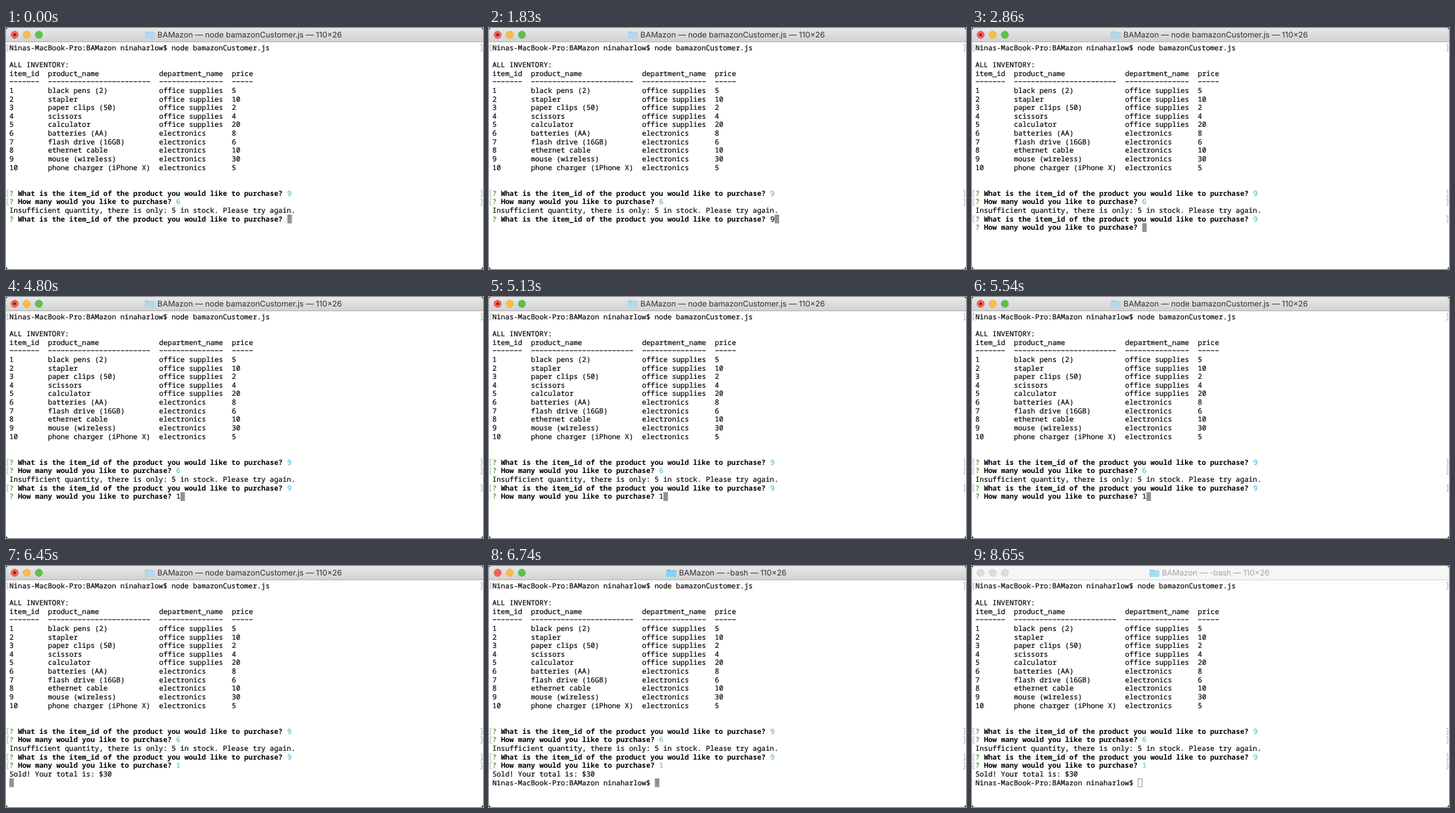
Write an HTML page that moves like this. It is 705 px wide and 356 px high and loops after 8820 ms.

```html
<!DOCTYPE html>
<html lang="en">
<head>
<meta charset="utf-8">
<title>Terminal</title>
<style>
html, body { margin: 0; width: 100%; height: 100%; overflow: hidden; background: #2b2b2b; }
svg { display: block; width: 705px; height: 356px; }
text { white-space: pre; text-rendering: geometricPrecision; }
.mono { font: 10.535px "Noto Sans Mono", "DejaVu Sans Mono", monospace; fill: #000; stroke: #000; stroke-width: .18px; }
.bold { font-weight: 700; stroke: none; }
.ok { fill: #5fa644; stroke: none; }
.answer { fill: #5ab9cf; stroke: #5ab9cf; }
.title { font: 11.55px Inter, "Open Sans", sans-serif; text-anchor: middle; }
.mark { fill: none; stroke: #a8a8a8; stroke-width: .9px; }
</style>
</head>
<body>
<svg id="stage" viewBox="0 0 705 356">
  <defs>
    <linearGradient id="bar" x1="0" y1="0" x2="0" y2="1">
      <stop offset="0" stop-color="#e8e8e8"/>
      <stop offset="1" stop-color="#d2d2d2"/>
    </linearGradient>
    <clipPath id="window"><rect width="705" height="356" rx="4.5"/></clipPath>
  </defs>
  <g id="root" clip-path="url(#window)"></g>
</svg>
<script>
const LOOP = 8820;
const TYPE_ID = 1830, SEND_ID = 2860, TYPE_QTY = 4800, SEND_QTY = 6450, DONE = 6580, BLUR = 8650;
const CELL = 6.321, ROW = 12.65, LEFT = 5, TOP = 23;
const HOST = 'Ninas-MacBook-Pro:BAMazon ninaharlow$ ';
const ASK_ID = 'What is the item_id of the product you would like to purchase?';
const ASK_QTY = 'How many would you like to purchase?';

const root = document.getElementById('root');
const timed = [];

function add(tag, attrs, from = 0, to = LOOP, label) {
  const el = document.createElementNS('http://www.w3.org/2000/svg', tag);
  for (const key in attrs) el.setAttribute(key, attrs[key]);
  if (label) el.textContent = label;
  root.append(el);
  if (from > 0 || to < LOOP) timed.push({ el, from, to });
}

const colX = col => LEFT + col * CELL;
const rowY = row => TOP + row * ROW;

function print(row, col, label, style = '', from, to) {
  add('text', { class: 'mono ' + style, x: colX(col), y: rowY(row) + 9.6 }, from, to, label);
}

function brackets(row, from) {
  const y = rowY(row) + 1.6;
  add('path', { class: 'mark', d: `M4 ${y}H1.8v9.4H4M701 ${y}h2.2v9.4H701` }, from);
}

function ask(row, question, from) {
  print(row, 0, '?', 'bold ok', from);
  print(row, 2, question, 'bold', from);
}

function answer(row, question, value, typed, sent) {
  const col = question.length + 3;
  if (typed < sent) print(row, col, value, '', typed, sent);
  print(row, col, value, 'answer', sent);
  brackets(row, sent);
}

function cursor(row, col, from, to, hollow) {
  const inset = hollow ? .5 : 0;
  add('rect', {
    x: colX(col) + inset, y: rowY(row) - .3 + inset,
    width: CELL + .3 - 2 * inset, height: ROW + .3 - 2 * inset,
    fill: hollow ? 'none' : '#929292', stroke: hollow ? '#929292' : 'none'
  }, from, to);
}

function folder(x, color, tab, from, to) {
  add('path', { d: `M${x} 6.2q0-1.2 1.2-1.2h4l1.4 1.3h6.6q1.2 0 1.2 1.2v7.3q0 1-1 1H${x + 1}q-1 0-1-1z`, fill: tab }, from, to);
  add('rect', { x, y: 7.5, width: 14.4, height: 8.3, rx: .9, fill: color }, from, to);
}

function lights(colors, rims, from, to) {
  colors.forEach((fill, i) => add('circle', {
    cx: 12.8 + i * 17.9, cy: 10, r: 5.4, fill, stroke: rims[i], 'stroke-width': .6
  }, from, to));
}

function titleText(label, from, to, fill = '#303030') {
  add('text', { class: 'title', x: 360.2, y: 14.3, fill }, from, to, label);
}

// Window
add('rect', { width: 705, height: 356, fill: '#fff' });
add('rect', { width: 705, height: 20, fill: 'url(#bar)' }, 0, BLUR);
add('rect', { width: 705, height: 20, fill: '#f6f6f6' }, BLUR);
add('rect', { y: 20, width: 705, height: 1, fill: '#b4b4b4' }, 0, BLUR);
add('rect', { y: 20, width: 705, height: 1, fill: '#d4d4d4' }, BLUR);
lights(['#f4605a', '#f8be44', '#5bc346'], ['#dc4c46', '#dca536', '#49ab37'], 0, BLUR);
lights(['#dcdcdc', '#dcdcdc', '#dcdcdc'], ['#c9c9c9', '#c9c9c9', '#c9c9c9'], BLUR);
add('circle', { cx: 12.8, cy: 10, r: 1.9, fill: '#7d120e' }, 0, DONE);
folder(205.3, '#b4d9ea', '#a4cfe3', 0, DONE);
folder(262.3, '#86d2f6', '#6cc2ea', DONE, BLUR);
folder(262.3, '#a9dcf4', '#98d0ec', BLUR);
const bashTitle = 'BAMazon — -bash — 110×26';
titleText('BAMazon — node bamazonCustomer.js — 110×26', 0, DONE);
titleText(bashTitle, DONE, BLUR);
titleText(bashTitle, BLUR, LOOP, '#a3a3a3');

// Inventory; the rules use the wide minus sign
const columns = [[0, 7], [9, 24], [35, 15], [52, 5]];
const office = 'office supplies', tech = 'electronics';
const items = [
  ['black pens (2)', office, 5], ['stapler', office, 10],
  ['paper clips (50)', office, 2], ['scissors', office, 4],
  ['calculator', office, 20], ['batteries (AA)', tech, 8],
  ['flash drive (16GB)', tech, 6], ['ethernet cable', tech, 10],
  ['mouse (wireless)', tech, 30], ['phone charger (iPhone X)', tech, 5]
];
const table = [
  ['item_id', 'product_name', 'department_name', 'price'],
  columns.map(([, width]) => '−'.repeat(width)),
  ...items.map((item, i) => [i + 1, ...item])
];
print(0, 0, HOST + 'node bamazonCustomer.js');
brackets(0);
print(2, 0, 'ALL INVENTORY:');
table.forEach((cells, r) => cells.forEach((cell, c) => print(r + 3, columns[c][0], String(cell))));

// Session
const idCol = ASK_ID.length + 3, qtyCol = ASK_QTY.length + 3;
cursor(20, idCol, 0, TYPE_ID);
cursor(20, idCol + 1, TYPE_ID, SEND_ID);
cursor(21, qtyCol, SEND_ID, TYPE_QTY);
cursor(21, qtyCol + 1, TYPE_QTY, SEND_QTY);
cursor(23, 0, SEND_QTY, DONE);
cursor(23, HOST.length, DONE, BLUR);
cursor(23, HOST.length, BLUR, LOOP, true);

ask(17, ASK_ID);
answer(17, ASK_ID, '9', 0, 0);
ask(18, ASK_QTY);
answer(18, ASK_QTY, '6', 0, 0);
print(19, 0, 'Insufficient quantity, there is only: 5 in stock. Please try again.');
ask(20, ASK_ID);
answer(20, ASK_ID, '9', TYPE_ID, SEND_ID);
ask(21, ASK_QTY, SEND_ID);
answer(21, ASK_QTY, '1', TYPE_QTY, SEND_QTY);
print(22, 0, 'Sold! Your total is: $30', '', SEND_QTY);
print(23, 0, HOST, '', DONE);

function draw() {
  const t = performance.now() % LOOP;
  for (const { el, from, to } of timed) {
    el.style.visibility = t >= from && t < to ? 'visible' : 'hidden';
  }
  requestAnimationFrame(draw);
}
draw();
</script>
</body>
</html>
```
